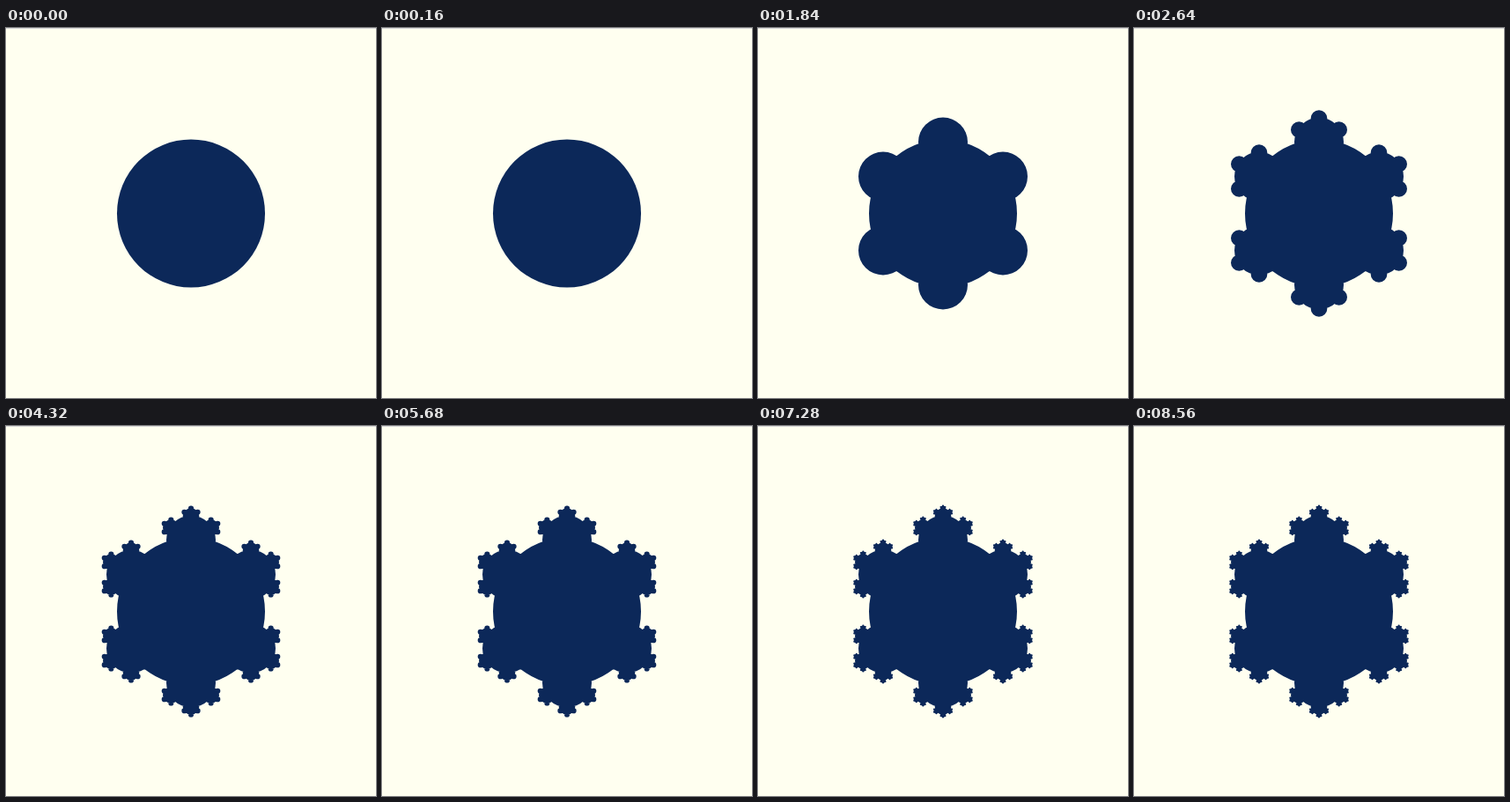
Write an HTML page with a canvas that moves like this. It is 420 px wide and 420 px high and loops after 8.8 s.

```html
<!DOCTYPE html>
<html lang="en">
<head>
<meta charset="utf-8">
<title>Circle snowflake</title>
<style>
  html, body { margin: 0; width: 100%; height: 100%; overflow: hidden; background: #fffff0; }
  canvas { display: block; width: 420px; height: 420px; }
</style>
</head>
<body>
<canvas id="stage" width="420" height="420"></canvas>
<script>
const SIZE = 420;
const LOOP = 8800;
const RADIUS = 84;
const CENTER = { x: 210, y: 210.5 };
const STEPS = [1040, 2640, 4320, 6080]; // each adds one generation of circles

// Child centres, as fractions of the parent radius
const DX = 68 / 84, DY = 0.5, TOP = 81 / 84;
const OFFSETS = [[0, -TOP], [DX, -DY], [DX, DY], [0, TOP], [-DX, DY], [-DX, -DY]];

const ctx = document.getElementById('stage').getContext('2d');
let shown = -1;

function addCircles(path, x, y, r, depth) {
  path.moveTo(x + r, y);
  path.arc(x, y, r, 0, Math.PI * 2);
  if (depth === 0) return;
  for (const [dx, dy] of OFFSETS) {
    addCircles(path, x + dx * r, y + dy * r, r / 3, depth - 1);
  }
}

function draw(depth) {
  ctx.fillStyle = '#fffff0';
  ctx.fillRect(0, 0, SIZE, SIZE);
  ctx.fillStyle = '#d9d9d9';
  ctx.fillRect(0, 0, SIZE, 1);

  const path = new Path2D();
  addCircles(path, CENTER.x, CENTER.y, RADIUS, depth);
  ctx.fillStyle = '#0c2859';
  ctx.fill(path);
}

const start = performance.now();

function tick() {
  const t = (performance.now() - start) % LOOP;
  const depth = STEPS.filter(step => t >= step).length;
  if (depth !== shown) {
    draw(depth);
    shown = depth;
  }
  requestAnimationFrame(tick);
}

tick();
</script>
</body>
</html>
```
